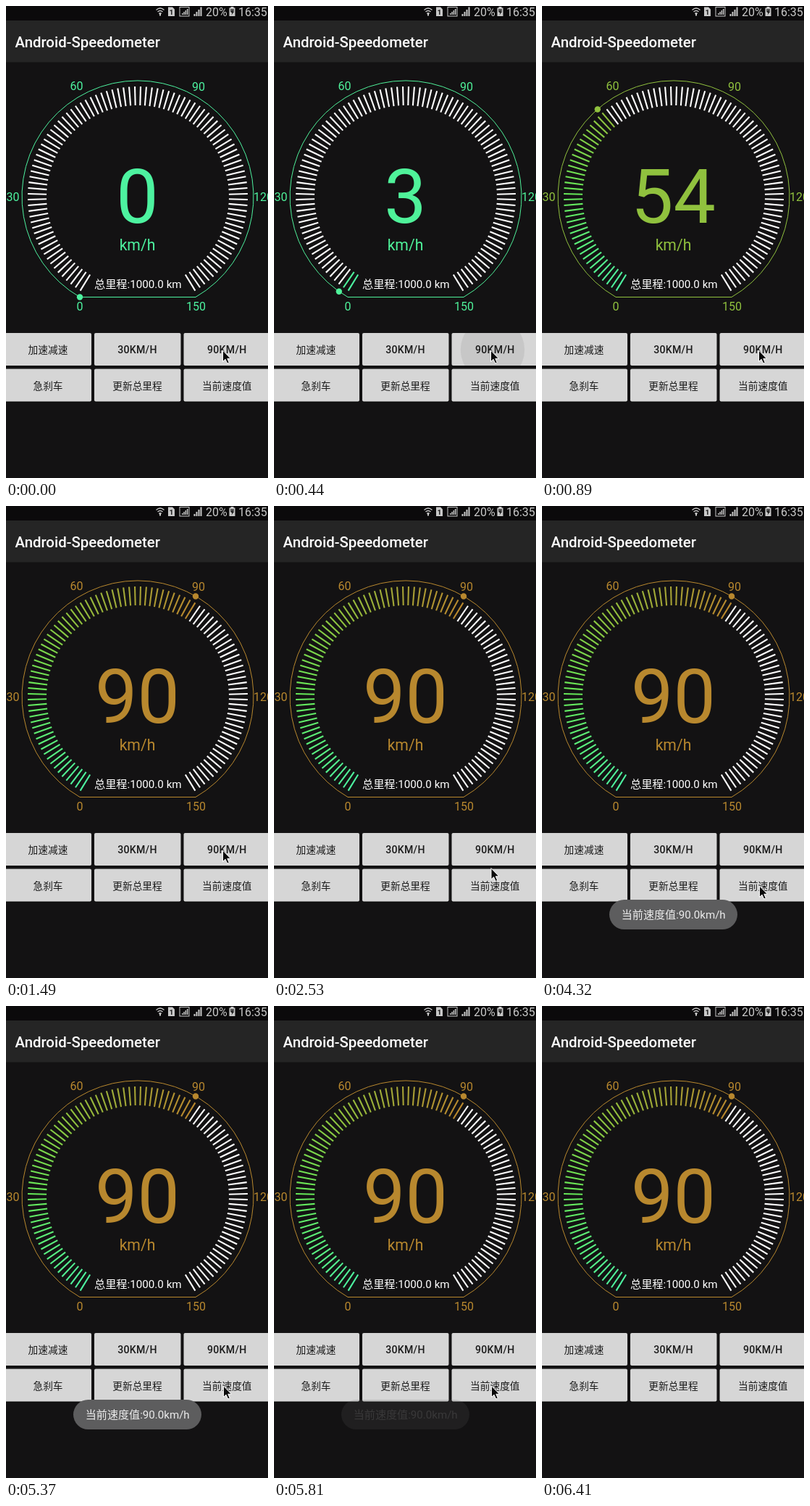
An HTML page for the animation above (6560 ms loop, 362x651 px).

```html
<!DOCTYPE html>
<html lang="zh-CN">
<head>
<meta charset="utf-8">
<title>Speedometer</title>
<style>
html, body { margin: 0; width: 100%; height: 100%; overflow: hidden; background: #131213; }
svg { display: block; width: 362px; height: 651px; }
text { font-family: Roboto, "Noto Sans CJK SC", "Noto Sans CJK", sans-serif; }
.mid { text-anchor: middle; }
.scale text { font-size: 16px; text-anchor: middle; }
.status text { font-size: 16px; }
.status { fill: #c9c9c9; }
.buttons text { font-size: 13.7px; text-anchor: middle; fill: #1b1b1b; }
.buttons .latin { font-size: 14.1px; font-weight: 500; letter-spacing: .3px; }
</style>
</head>
<body>
<svg viewBox="0 0 362 651">
  <defs>
    <clipPath id="clip0"><rect x="245.5" y="451" width="121" height="45" rx="2"/></clipPath>
    <clipPath id="clip1"><rect x="245.5" y="500.5" width="121" height="45" rx="2"/></clipPath>
  </defs>
  <rect width="362" height="651" fill="#131213"/>
  <rect width="362" height="20" fill="#0b0a0b"/>
  <rect y="20" width="362" height="57" fill="#252525"/>
  <rect y="77" width="362" height="1" fill="#1b1b1b"/>

  <g class="status">
    <g fill="none" stroke="#c9c9c9" stroke-width="1.3">
      <path d="M207.5 5.5q5.500 -5 11 0M209.500 8q3.500 -3 7 0M211.300 10.500q1.700 -1.500 3.400 0"/>
      <path d="M213 10v3.500" stroke-width="2"/>
      <rect x="240" y="1.500" width="13" height="12.500" stroke-width="1"/>
    </g>
    <path d="M224 1.500h6l3 3v9.500h-9z"/>
    <text x="228.400" y="11.600" class="mid" style="font-size:9.500px;font-weight:700" fill="#111">1</text>
    <path d="M243 12v-2h1.500v2zM245.300 12v-4h1.500v4zM247.600 12v-6h1.500v6zM249.900 12v-8h1.500v8z"/>
    <path d="M259.500 14v-3h2v3zM262.500 14v-6h2v6zM265.500 14v-9h2v9zM268.500 14v-12.500h2v12.500z"/>
    <text x="276" y="13.700">20%</text>
    <path d="M310.500 1h4v1.500h2v11.500h-8v-11.500h2z"/>
    <path d="M310 4h5v4h-5z" fill="#555"/>
    <path d="M313.500 5l-3 4h2l-1 3.500 3.500-4.500h-2z" fill="#111"/>
    <text x="321" y="13.700">16:35</text>
  </g>
  <text x="12.600" y="56.500" font-size="20.400" font-weight="500" fill="#fff">Android-Speedometer</text>

  <path id="ring" d="M102 401.500A160 160 0 1 1 262 401.500Z" fill="none" stroke-width="1"/>
  <g id="ticks" stroke-width="2.100"></g>
  <g id="tinted">
    <g class="scale">
      <text x="102" y="420">0</text>
      <text x="9.500" y="269">30</text>
      <text x="97.500" y="116">60</text>
      <text x="266" y="117">90</text>
      <text x="355.500" y="269">120</text>
      <text x="262.500" y="420">150</text>
    </g>
    <text id="speed" class="mid" x="181.500" y="298.500" font-size="104"></text>
    <text class="mid" x="181.500" y="336.500" font-size="21.200">km/h</text>
    <circle id="dot" r="4.200"/>
  </g>
  <text class="mid" x="182.300" y="388.500" font-size="15.200" fill="#fff">总里程:1000.0 km</text>

  <g class="buttons" id="buttons"></g>
  <circle class="ripple" clip-path="url(#clip0)" cx="302" cy="474"/>
  <circle class="ripple" clip-path="url(#clip1)" cx="302" cy="523"/>
  <g class="buttons" id="labels"></g>

  <g id="toast">
    <rect x="93" y="543" width="177" height="41" rx="20.500" fill="#5d5d5e"/>
    <text class="mid" x="181.700" y="569.300" font-size="15.100" fill="#ececec">当前速度值:90.0km/h</text>
  </g>
  <path id="cursor" d="M0 0V15.500L3.600 12.200L6.200 18L8.800 16.900L6.300 11.300H11Z" fill="#0a0a0a" stroke="#fff" stroke-width="1"/>
</svg>
<script>
const LOOP = 6560, STEPS = 44, STEP = LOOP / STEPS;
const CX = 182, CY = 263;
const $ = id => document.getElementById(id);
const clamp = x => Math.min(1, Math.max(0, x));
const ramp = (t, from, to) => clamp((t - from) / (to - from));
const ease = x => (1 - Math.cos(Math.PI * x)) / 2;

function add(parent, tag, attrs, text = '') {
  const el = document.createElementNS('http://www.w3.org/2000/svg', tag);
  for (const k in attrs) el.setAttribute(k, attrs[k]);
  el.textContent = text;
  return parent.appendChild(el);
}

function polar(deg, r) {
  const a = deg * Math.PI / 180;
  return [CX + r * Math.cos(a), CY + r * Math.sin(a)];
}

// Speed to colour, from mint through green to amber
const stops = [[0, 77, 243, 160], [30, 102, 232, 88], [54, 144, 194, 62], [90, 184, 136, 46]];
function tint(v) {
  const i = v < 30 ? 0 : v < 54 ? 1 : 2;
  const a = stops[i], b = stops[i + 1];
  const p = ramp(v, a[0], b[0]);
  return `rgb(${[1, 2, 3].map(k => Math.round(a[k] + (b[k] - a[k]) * p))})`;
}

const ticks = Array.from({ length: 100 }, (_, i) => {
  const deg = 121.5 + 3 * i;
  const [x1, y1] = polar(deg, 126), [x2, y2] = polar(deg, 152);
  return add($('ticks'), 'line', { x1, y1, x2, y2 });
});

[['加速减速', '30KM/H', '90KM/H'], ['急刹车', '更新总里程', '当前速度值']].forEach((row, r) =>
  row.forEach((label, c) => {
    const x = [-2, 122, 245.5][c], y = 451 + 49.5 * r;
    const width = c ? 119.5 : 120;
    add($('buttons'), 'rect', { x, y: y + 1, width, height: 45, rx: 2, fill: '#050505' });
    add($('buttons'), 'rect', { x, y, width, height: 45, rx: 2, fill: '#d6d6d6' });
    add($('labels'), 'text', {
      x: [58, 181.5, 305.3][c], y: y + 28.3, class: label.includes('KM') ? 'latin' : ''
    }, label);
  }));

const ripples = document.querySelectorAll('.ripple');
function drawRipple(el, age) {
  el.setAttribute('r', 30 + 27 * ramp(age, 0, 300));
  el.setAttribute('opacity', age < 0 ? 0 : 0.07 * (1 - ramp(age, 320, 680)));
}

function draw(t) {
  const v = 90 * ease(ramp(t, 157, 1457));
  const color = tint(v);
  const [x, y] = polar(120 + 2 * v, 160);
  $('ring').setAttribute('stroke', color);
  $('tinted').setAttribute('fill', color);
  $('speed').textContent = Math.round(v);
  $('dot').setAttribute('cx', x);
  $('dot').setAttribute('cy', y);
  ticks.forEach((el, i) =>
    el.setAttribute('stroke', v > 0 && i * 1.5 <= v ? tint(i * 1.5) : '#fff'));

  drawRipple(ripples[0], t - 140);
  drawRipple(ripples[1], t - 3125);
  $('toast').setAttribute('opacity', ramp(t, 3350, 3800) * (1 - ramp(t, 5400, 5900)));

  const move = ease(ramp(t, 2236, 2832));
  $('cursor').setAttribute('transform', `translate(${299.5 + move} ${475 + 49 * move})`);
  $('cursor').setAttribute('opacity', t < 6100 ? 1 : 0);
}

const start = performance.now();
let last = -1;
function tick(now) {
  const t = Math.max(0, now - start) % LOOP;
  const step = Math.floor((t + 6) / STEP) % STEPS;
  if (step !== last) draw((last = step) * STEP);
  requestAnimationFrame(tick);
}
tick(start);
</script>
</body>
</html>
```
